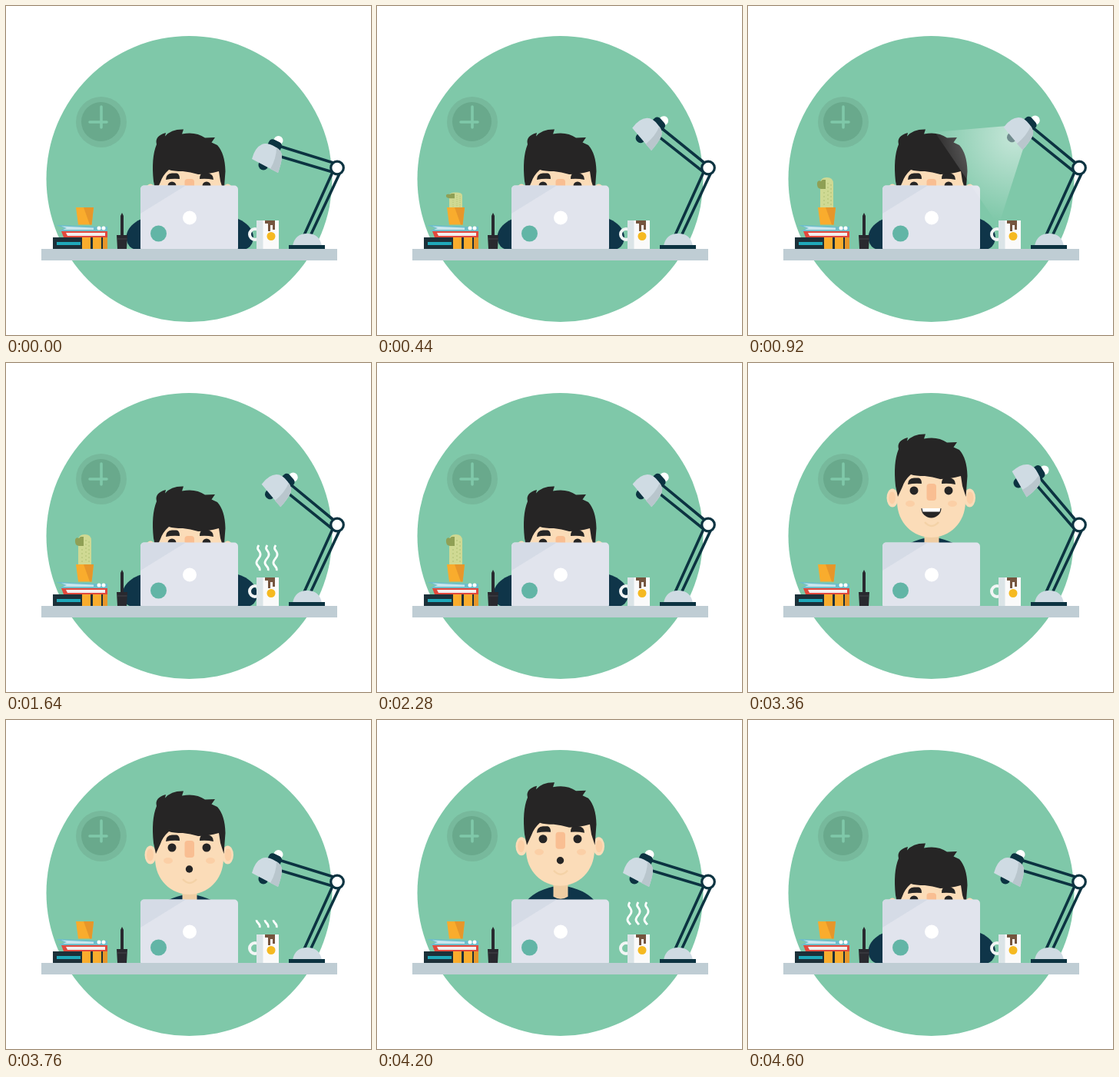
Recreate the animation shown at these times as an HTML page. Size 475 by 428 pixels, loop 4.64 s.

```html
<!DOCTYPE html>
<html lang="en">
<head>
<meta charset="utf-8">
<title>Desk</title>
<style>
  html, body { margin: 0; width: 100%; height: 100%; overflow: hidden; background: #fff; }
  svg { display: block; width: 100vw; height: 100vh; }
</style>
</head>
<body>
<svg viewBox="0 0 475 428">
  <defs>
    <radialGradient id="glow" gradientUnits="userSpaceOnUse" cx="348" cy="170" r="112">
      <stop offset="0" stop-color="#fff" stop-opacity=".55"/>
      <stop offset="1" stop-color="#fff" stop-opacity="0"/>
    </radialGradient>
    <path id="sleeve" d="M190 273C167 277 154 291 157 305Q159 314 168 317H190Z" fill="#0f3549"/>
  </defs>

  <circle cx="238.5" cy="225" r="186" fill="#7fc8a9"/>

  <g id="clock">
    <circle cx="124" cy="151" r="33" fill="#77b99c"/>
    <circle cx="123.500" cy="150.500" r="25.500" fill="#69a98c"/>
    <path d="M124 131V158M109 151H131" stroke="#7fc8a9" stroke-width="3.600" stroke-linecap="round"/>
  </g>

  <g id="leftArm"><use href="#sleeve"/></g>
  <g id="rightArm"><use href="#sleeve" transform="matrix(-1 0 0 1 478.500 0)"/></g>

  <g id="man">
    <path d="M192 250Q203 234 229 228H249Q275 234 286 250Z" fill="#0f3549"/>
    <path d="M229.500 218H248.500V241Q239 247 229.500 241Z" fill="#efcda3"/>
    <g fill="#fbdcb8">
      <ellipse cx="188" cy="175.500" rx="7.500" ry="12"/>
      <ellipse cx="288.500" cy="175.500" rx="7.500" ry="12"/>
      <path d="M194 130H283V180C283 208 262 227 238.500 227S194 208 194 180Z"/>
    </g>
    <g fill="#fbcfa6">
      <ellipse cx="187.500" cy="175.500" rx="4.500" ry="8"/>
      <ellipse cx="289" cy="175.500" rx="4.500" ry="8"/>
      <ellipse cx="211" cy="183" rx="6" ry="4"/>
      <ellipse cx="266" cy="183" rx="6" ry="4"/>
      <rect x="232.500" y="157" width="12.500" height="22" rx="4" fill="#f9be92"/>
    </g>
    <path d="M230 207Q239 217 248 207" fill="none" stroke="#f4d2a7" stroke-width="2.500"/>
    <g fill="#262525">
      <path d="M195 174L192 160C190 140 191 124 196 112Q193 101 208 97L207 101.500Q215 92 231 92.500L229 98.500Q247 95 259 103.500L272 103L267.500 109.500L275 113Q285 124 285.500 147L283.500 174L279 160L277 147Q263 151 250 151Q240 148 230 147Q218 147 212 145Q204 152 201 161Z"/>
      <circle cx="216" cy="166" r="5.500"/>
      <circle cx="261" cy="166" r="5.500"/>
      <path d="M208 158Q208 150 216 149.500H222Q226 150 226 157Q217 156 208 158Z"/>
      <path d="M270 158Q270 150 262 149.500H256Q252 150 252 157Q261 156 270 158Z"/>
    </g>
    <g id="smile">
      <path d="M225.500 189H251.500A13 12.500 0 0 1 225.500 189Z" fill="#262525"/>
      <path d="M226.500 189H250.500L249.500 193.500H227.500Z" fill="#fff"/>
    </g>
    <circle id="ooh" cx="238.500" cy="194" r="4.700" fill="#262525"/>
  </g>

  <g id="laptop">
    <rect x="175" y="233.500" width="127" height="86" rx="5" fill="#e1e4ed"/>
    <path d="M175 270V238.500Q175 233.500 180 233.500H234Z" fill="#d5dbe6"/>
    <circle cx="239" cy="275.500" r="9" fill="#fff"/>
    <circle cx="198.500" cy="296" r="10.500" fill="#62b5a6"/>
  </g>

  <g id="books">
    <path d="M65 285H72L118 287H132V293H68L76 289Z" fill="#6dbecb"/>
    <path d="M72 286.500L114 288.500V291H74L79 289Z" fill="#c9e6ee"/>
    <circle cx="121" cy="289" r="2.500" fill="#fff"/>
    <circle cx="127" cy="289" r="2.500" fill="#fff"/>
    <path d="M72 293H132V301H75Z" fill="#e2493d"/>
    <path d="M78 295H129V299H80Z" fill="#f3eeee"/>
    <path d="M61 301H99V316H61Z" fill="#1c3039"/>
    <path d="M66 307H97V311H66Z" fill="#1fa9ba"/>
    <path d="M99 301H132V316H99Z" fill="#f9ac2d"/>
    <path d="M110 301H113V316H110ZM124 301H126V316H124Z" fill="#1c3039"/>
    <path d="M126 301H132V316H126Z" fill="#e7962a"/>
  </g>

  <g id="cactus">
    <path d="M94 264V231Q94 223 102.500 223T111 231V264Z" fill="#cfd993"/>
    <path d="M95 238Q89 237 90 230Q91 226 95 228L97 226H101V238Z" fill="#8fa055"/>
    <path d="M99 242V260M104 230V260M108 232V260" stroke="#b7c57a" stroke-width="1.300" stroke-dasharray="2 3"/>
  </g>
  <path d="M91 262H114L111.500 284.500H94Z" fill="#f9ac2d"/>
  <path d="M101 262H114L111.500 284.500H109Z" fill="#e7962a"/>

  <path d="M149 298V273L151 269L153 273V298H158L157 316H145L144 298Z" fill="#29292f"/>
  <path d="M145 303H157.500" stroke="#45454b"/>

  <g id="mug">
    <circle cx="324" cy="297" r="7" fill="none" stroke="#f2f5f5" stroke-width="4"/>
    <path d="M326 279H355V317H326Z" fill="#fafafa"/>
    <path d="M326 279H334.500V317H326Z" fill="#dbe4e7"/>
    <path d="M337 279H350V291H347V285H344V293H341V283H337Z" fill="#75553f"/>
    <circle cx="345" cy="299.500" r="5.500" fill="#f5b921"/>
    <g id="steam" fill="none" stroke="#fff" stroke-width="2.800"></g>
  </g>

  <path d="M46 316H431V331H46Z" fill="#bfcdd4"/>

  <path id="light" d="M243 164L337 156L358 186L326 286Z" fill="url(#glow)"/>

  <g id="lamp" stroke="#0c3341" stroke-width="3.600">
    <path d="M426 214L388 298M435 216L396 299"/>
    <path id="upperRod" d="M355 182L426 204"/>
    <path id="lowerRod" d="M351 194L425 216"/>
    <g id="shade" stroke="none">
      <circle cx="354.500" cy="175" r="6" fill="#fff"/>
      <circle id="bulb" cx="335" cy="207" r="6.500"/>
      <rect x="341" y="175" width="18" height="13" rx="5" transform="rotate(26 350 181)" fill="#0c3341"/>
      <path d="M320 199Q324 184 333 180Q340 177 350 183Q360 188 359 197Q358 206 354 217Z" fill="#cfdbe3"/>
      <path d="M344 212Q352 198 352 184Q360 189 359 197Q358 206 354 217Z" fill="#b9c6cd"/>
    </g>
    <circle cx="431" cy="210.500" r="8.300" fill="#fff" stroke-width="3.200"/>
    <path d="M373 312Q376 296 392 296T411 312Z" fill="#cfdbe3" stroke="none"/>
    <path d="M368 311H415V316H368Z" fill="#0c3341" stroke="none"/>
  </g>
</svg>
<script>
const LOOP = 4640;
const $ = id => document.getElementById(id);
const ramp = (t, start, length) => Math.min(1, Math.max(0, (t - start) / length));
const backIn = (u, s) => u * u * ((s + 1) * u - s);
const backOut = (u, s) => 1 - backIn(1 - u, s);
const move = (id, x, y) => $(id).setAttribute('transform', `translate(${x} ${y})`);
const turn = (id, angle, x, y) => $(id).setAttribute('transform', `rotate(${angle} ${x} ${y})`);
const show = (id, visible) => $(id).style.display = visible ? '' : 'none';

// Rises to 1 with overshoot, later drops to 0 after an anticipation.
const upDown = (t, up, upTime, down, downTime, s) =>
  t < down ? backOut(ramp(t, up, upTime), s) : 1 - backIn(ramp(t, down, downTime), s);

$('steam').innerHTML = [0, 11, 22].map(x =>
  `<path pathLength="1" transform="translate(${x})" d="M330 270C332 265 325 264 326 259C327 254 332 253 331 248C330 243 325 243 329 237"/>`
).join('');

function drawSteam(t) {
  const start = t < 3000 ? 1240 : 3640;
  const head = ramp(t, start, 400), tail = ramp(t, start + 520, 400);
  show('steam', head > tail);
  $('steam').setAttribute('stroke-dasharray', `0 ${tail} ${head - tail} 2`);
}

function drawLamp(t) {
  const angle = 22.3 * upDown(t, 360, 470, 3100, 470, 4.6);
  turn('shade', angle, 431, 210.5);
  // Each rod swings on its own pivot, like a parallel linkage.
  turn('upperRod', angle, 426, 204);
  turn('lowerRod', angle, 425, 216);
  const light = ramp(t, 830, 80) - ramp(t, 1440, 80);
  $('light').setAttribute('opacity', light);
  $('bulb').setAttribute('fill', light > 0.5 ? '#708b8d' : '#0c3341');
}

function drawMan(t) {
  const rise = upDown(t, 2435, 940, 3960, 520, 2.3);
  move('man', 0, 68 * (1 - rise));
  const ooh = t >= 3560 && t < 4400;
  show('smile', !ooh);
  show('ooh', ooh);

  const typing = t > 1160 && t < 2440 ? 5 * Math.sin(Math.PI * (t - 1160) / 320) ** 2 : 0;
  const tuck = 24 * (ramp(t, 2420, 180) - ramp(t, 4300, 180));
  move('leftArm', tuck - typing, 0);
  move('rightArm', typing - tuck, 0);
}

function drawCactus(t) {
  const growth = Math.max(0, upDown(t, 380, 450, 2880, 430, 1.7));
  $('cactus').setAttribute('transform', `translate(0 ${264 * (1 - growth)}) scale(1 ${growth})`);
  show('cactus', growth > 0);
}

function tick() {
  const t = performance.now() % LOOP;
  for (const draw of [drawMan, drawCactus, drawSteam, drawLamp]) draw(t);
  requestAnimationFrame(tick);
}
tick();
</script>
</body>
</html>
```
